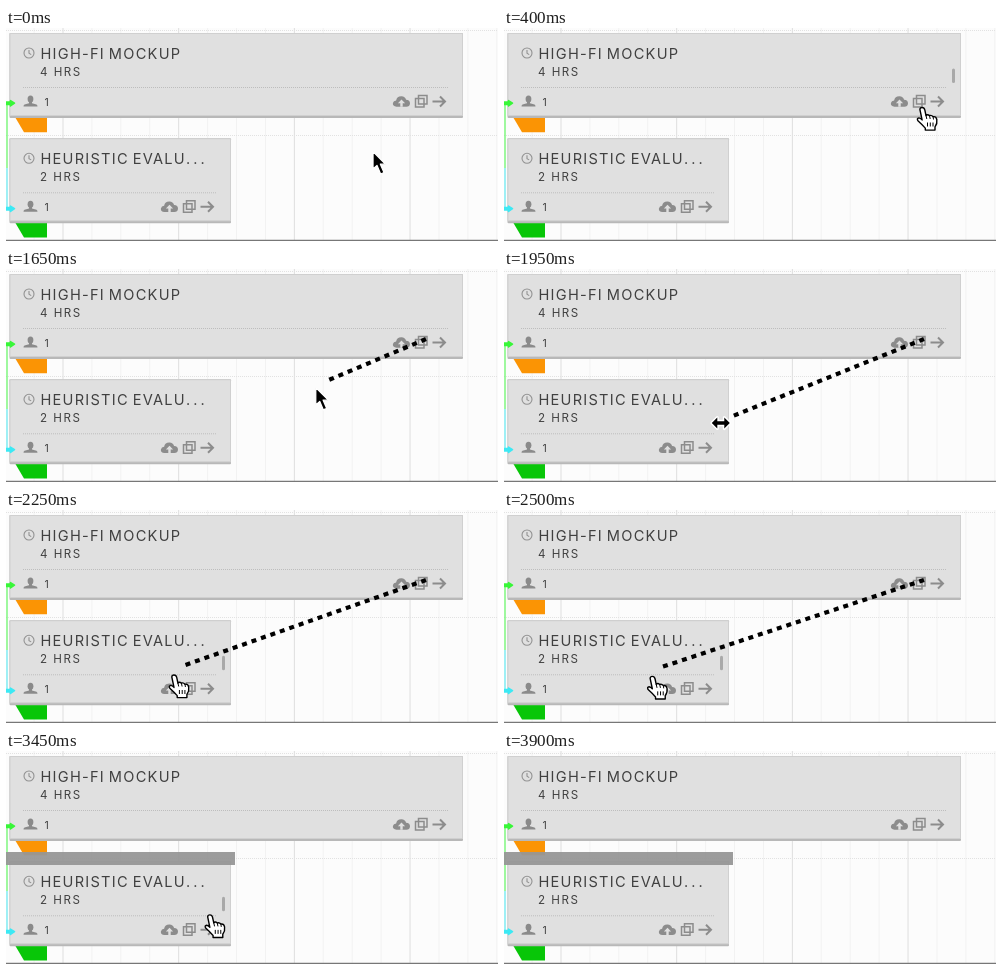
Write an HTML page that moves like this. It is 492x213 px and loops after 3.95 s.

```html
<!DOCTYPE html>
<html lang="en">
<head>
<meta charset="utf-8">
<title>Linking tasks</title>
<style>
html, body { margin: 0; width: 100%; height: 100%; overflow: hidden; background: #fcfcfc; }
svg { display: block; width: 492px; height: 213px; }
text { font-family: Inter, "Open Sans", sans-serif; fill: #404040; }
.title { font-size: 14.6px; letter-spacing: 1.25px; word-spacing: -1.5px; }
.dots { letter-spacing: 3px; }
.hours { font-size: 11.6px; letter-spacing: 1.5px; }
.count { font-size: 10.5px; }
.cursor { stroke-linejoin: round; }
</style>
</head>
<body>
<svg viewBox="0 0 492 213">
  <defs>
    <g id="clock" fill="none" stroke="#929292" stroke-width="1.1">
      <circle r="5"/><path d="M0-3V.3L2.2 1.6"/>
    </g>
    <g id="person" fill="#8a8a8a">
      <ellipse cy="-2.6" rx="2.9" ry="3.5"/>
      <path d="M-1.5 0H1.5V1.8L6 3Q7 3.4 7 5H-7Q-7 3.4-6 3L-1.5 1.8Z"/>
    </g>
    <g id="tools">
      <path fill="#8c8c8c" d="M-5.5 5.2Q-9.5 5-9.1 1.6Q-8.5-1-5.9-1Q-4.9-5.4-.5-5.2Q3.1-5 4.1-1.8Q8.1-1.6 8 2Q7.7 5.2 4.3 5.2Z"/>
      <path fill="#e0e0e0" d="M-.5-2L3.1 1.8H.7V5.2H-1.7V1.8H-4.1Z"/>
      <path fill="none" stroke="#8c8c8c" stroke-width="1.5" d="M16.5-6H25V2.5H16.5ZM13.5-3H22V5.5H13.5Z"/>
      <path fill="none" stroke="#8c8c8c" stroke-width="2" d="M30.5 0H43M38-5L43 0L38 5"/>
    </g>
    <path id="inlet" d="M0 74H4.5V72.5L8.5 75.2L4.5 78V76.5H0Z" stroke-width="1.5" stroke-linejoin="round"/>
  </defs>
  <rect width="492" height="213" fill="#fcfcfc"/>
  <g id="grid" stroke-width="1"></g>
  <path d="M1 76V140" stroke="#6cf66c" stroke-width="1.3"/>
  <path d="M1 140V180" stroke="#6ce9f2" stroke-width="1.3"/>
  <g id="cards"></g>
  <use href="#inlet" fill="#38f638" stroke="#38f638"/>
  <use href="#inlet" y="105.5" fill="#3ce9f4" stroke="#3ce9f4"/>
  <rect id="bar" y="101" width="229" height="13" fill="#969696" opacity=".94"/>
  <path d="M0 212.3H492" stroke="#777" stroke-width="1.2"/>
  <line id="link" x1="420" y1="70" stroke="#000" stroke-width="4.2" stroke-dasharray="5 5"/>
  <g id="pointer" class="cursor">
    <path id="arrow" d="M0 0V17.5L4 14L7.6 22.5L11 21L7.4 12.7H12.6Z" fill="#000" stroke="#fff" stroke-width="1.3"/>
    <g id="hand" fill="#fff" stroke="#000" stroke-width="1.4">
      <path d="M-2.6 2Q-2.5 0-.4 0Q1.8 0 2.3 2.4L3.5 8Q5 6.4 7 8.1Q9 7.3 10.6 9.2Q13.6 8.7 14.3 12Q15 16 12.5 19.4V22.6H2.8V20.6Q-.4 17-4.6 13.2Q-6 10.6-3.6 10.4Q-2 10.6-.4 12.4Z"/>
      <path d="M3.5 8L4.3 11.5M7 8.1L7.7 11.5M10.6 9.2L11 12M5 15V19M7.8 15V19M10.5 15V19" stroke-width="1"/>
    </g>
    <path id="resize" d="M-9 0L-3.5-5.5V-1.7H3.5V-5.5L9 0L3.5 5.5V1.7H-3.5V5.5Z" fill="#000" stroke="#fff" stroke-width="3" paint-order="stroke"/>
  </g>
</svg>
<script>
const LOOP = 3950;
const $ = id => document.getElementById(id);
const show = (id, on) => $(id).setAttribute("visibility", on ? "visible" : "hidden");

const cards = [
  { y: 5, right: 457, title: "HIGH-FI MOCKUP", dots: "", hours: "4 HRS", flag: "#fb9404" },
  { y: 110.3, right: 225, title: "HEURISTIC EVALU", dots: "...", hours: "2 HRS", flag: "#08c608" }
];

function cardMarkup({ y, right, title, dots, hours, flag }, i) {
  const w = right - 4;
  return `<g transform="translate(4 ${y})">
    <path d="M5 84H37V99.3H14Z" fill="${flag}"/>
    <rect x="-.5" width="${w + .5}" height="85" rx="1" fill="#b8b8b8"/>
    <rect y=".5" width="${w - .5}" height="82" fill="#e0e0e0" stroke="#d0d0d0"/>
    <path d="M13 54.5H${w - 14}" stroke="#bdbdbd" stroke-dasharray="1 1"/>
    <use href="#clock" x="19" y="20"/>
    <text class="title" x="30.5" y="26">${title}<tspan class="dots">${dots}</tspan></text>
    <text class="hours" x="30" y="43">${hours}</text>
    <use href="#person" x="20.5" y="68.5"/>
    <text class="count" x="34.5" y="73">1</text>
    <use href="#tools" x="${w - 61}" y="68.5"/>
    <rect id="scroll${i}" x="${w - 9}" y="35.5" width="3" height="14.5" rx="1.5" fill="#a9a9a9"/>
  </g>`;
}

function gridMarkup() {
  let out = "";
  for (let i = -1; i < 16; i++) {
    const x = 57 + i * 28.92;
    out += `<path d="M${x} 0V212" stroke="${i % 4 ? "#f2f2f2" : "#dedede"}"/>`;
  }
  for (const y of [2.5, 107.5])
    out += `<path d="M0 ${y}H492" stroke="#e2e2e2" stroke-dasharray="1 1"/>`;
  return out;
}

$("grid").innerHTML = gridMarkup();
$("cards").innerHTML = cards.map(cardMarkup).join("");

// time, x, y of the pointer's hot spot
const path = [
  [0, 367, 123.5], [50, 368, 122], [350, 418.5, 79.5], [500, 418.5, 79.5],
  [800, 419.5, 69.5], [1200, 419.5, 69.5], [1950, 217, 154], [2250, 168.5, 165],
  [2600, 146, 166.5], [2850, 145.5, 166.5], [3350, 145.5, 166.5], [3750, 515, 150]
];

const slope = (i, c) => (path[i + 1][c] - path[i][c]) / (path[i + 1][0] - path[i][0]);

// monotone tangent: rests at holds and turning points
function tangent(i, c) {
  if (i === 0 || i === path.length - 1) return 0;
  const a = slope(i - 1, c), b = slope(i, c);
  return a * b > 0 ? 2 * a * b / (a + b) : 0;
}

function position(t) {
  const last = path.length - 1;
  if (t >= path[last][0]) return path[last].slice(1);
  const i = path.findIndex((p, n) => t < path[n + 1][0]);
  const span = path[i + 1][0] - path[i][0];
  const u = (t - path[i][0]) / span, v = 1 - u;
  return [1, 2].map(c =>
    path[i][c] * (1 + 2 * u) * v * v + path[i + 1][c] * u * u * (3 - 2 * u) +
    span * u * v * (tangent(i, c) * v - tangent(i + 1, c) * u));
}

const ramp = (t, from, span) => Math.min(1, Math.max(0, (t - from) / span));

function draw(t) {
  const [x, y] = position(t);
  const over = cards.findIndex(c => x > 4 && x < c.right && y > c.y && y < c.y + 85);
  const edge = over >= 0 && x > cards[over].right - 13;

  $("pointer").setAttribute("transform", `translate(${x} ${y})`);
  show("arrow", over < 0);
  show("hand", over >= 0 && !edge);
  show("resize", edge);
  cards.forEach((c, i) => show("scroll" + i, over === i && !edge));

  const k = ramp(t, 1950, 300);
  const pull = ramp(t, 1250, 200);
  $("link").setAttribute("x2", x + (12 - 4 * k) * pull);
  $("link").setAttribute("y2", y - (7 + 2 * k) * pull);
  show("link", t >= 1250 && t < 2800);
  show("bar", t >= 2800);
}

const start = performance.now();
function tick() {
  draw((performance.now() - start) % LOOP);
  requestAnimationFrame(tick);
}
tick();
</script>
</body>
</html>
```
